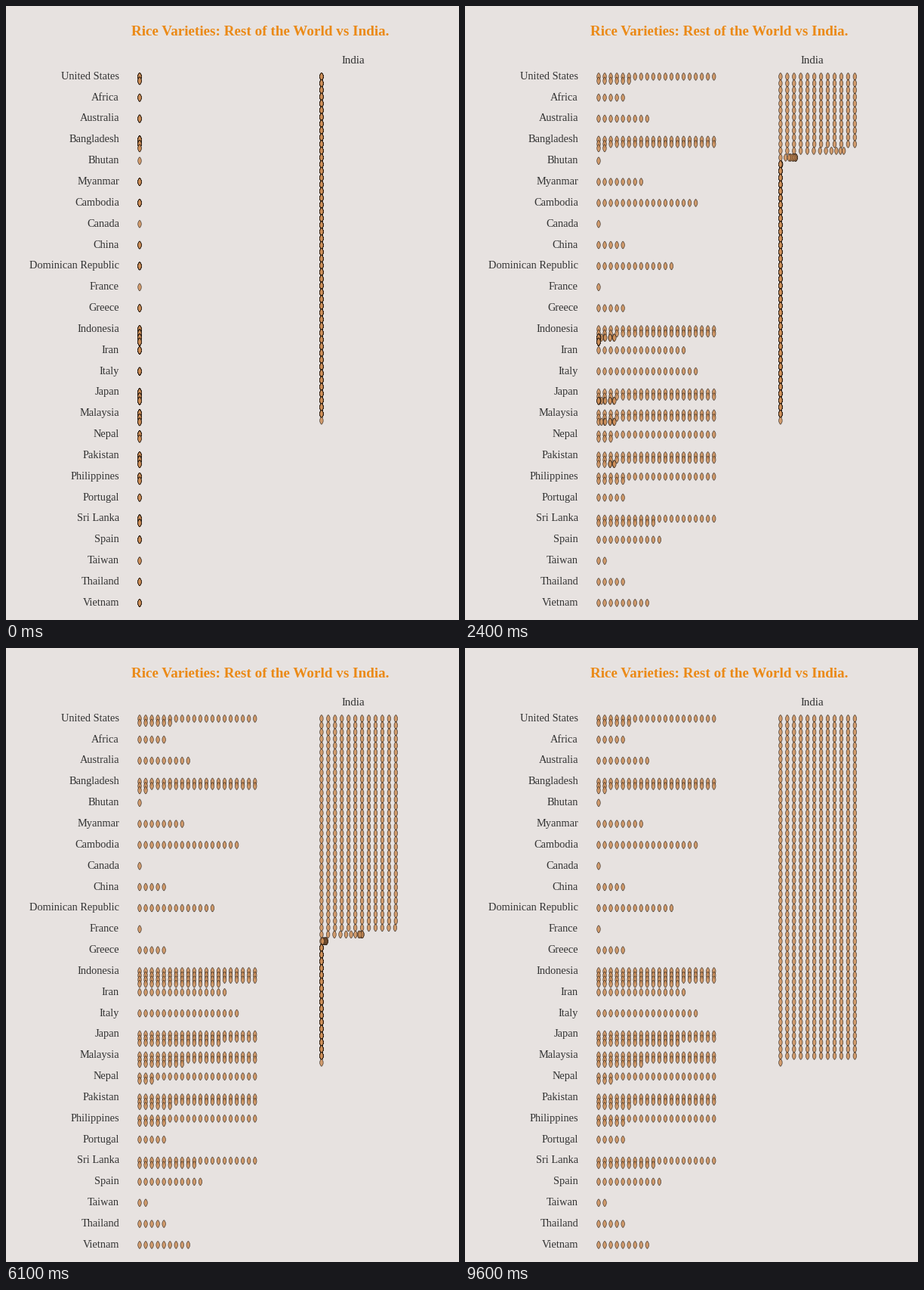
A matplotlib script that plays this animation: 600 by 812 pixels, repeating every 9800 ms.

```python
import numpy as np
import matplotlib.pyplot as plt
from matplotlib.animation import FuncAnimation
from matplotlib.collections import PathCollection
from matplotlib.path import Path
from matplotlib.transforms import IdentityTransform

W, H, DPI = 600, 812, 64
PX = 72 / DPI  # points per pixel
FRAMES, STEP = 98, 100

BACK, INK, TITLE = "#e7e2e0", "#333333", "#eb8a17"
FILL, EDGE = (0.81, 0.565, 0.35, 0.85), (0.08, 0.05, 0.03, 0.72)

COUNTS = {
    "United States": 26, "Africa": 5, "Australia": 9, "Bangladesh": 42,
    "Bhutan": 1, "Myanmar": 8, "Cambodia": 17, "Canada": 1, "China": 5,
    "Dominican Republic": 13, "France": 1, "Greece": 5, "Indonesia": 74,
    "Iran": 15, "Italy": 17, "Japan": 54, "Malaysia": 48, "Nepal": 23,
    "Pakistan": 46, "Philippines": 25, "Portugal": 5, "Sri Lanka": 30,
    "Spain": 11, "Taiwan": 2, "Thailand": 5, "Vietnam": 9,
}
INDIA = 613
TOP, PITCH = 93.4, 27.84
TRAVEL = 500  # ms each grain takes to slide into place
LEAD = 78     # ms already elapsed at the first frame


def block(n, cols, x, y, dx, dy, delay):
    """Rows of: start x, distance to slide, y, start time."""
    i = np.arange(n)
    return np.column_stack([np.full(n, x), i % cols * dx,
                            y + i // cols * dy, i * delay])


def ease(u):
    u = np.clip(u, 0, 1)
    return np.where(u < 0.5, 4 * u**3, 1 - 4 * (1 - u)**3)


blocks = [block(n, 20, 177, TOP + k * PITCH, 8.04, PITCH / 5, 50)
          for k, n in enumerate(COUNTS.values())]
blocks.append(block(INDIA, 12, 417.9, TOP, 8.95, 8.92, 15))
x0, slide, y0, start = np.vstack(blocks).T

grain = Path([(0, -5), (3.1, -2.3), (3.1, 2.3), (0, 5),
              (-3.1, 2.3), (-3.1, -2.3), (0, -5)],
             [Path.MOVETO] + [Path.CURVE4] * 6)

fig = plt.figure(figsize=(W / DPI, H / DPI), dpi=DPI, facecolor=BACK)
ax = fig.add_axes([0, 0, 1, 1])
ax.set_xlim(0, W)
ax.set_ylim(H, 0)
ax.axis("off")


def label(x, y, text, size, ha, color=INK, weight="normal"):
    ax.text(x, y, text, fontsize=size * PX, ha=ha, va="baseline", color=color,
            weight=weight, family="Liberation Serif")


label(337, 39, "Rice Varieties: Rest of the World vs India.", 19.1, "center",
      TITLE, "bold")
label(460, 76.5, "India", 15, "center")
for k, name in enumerate(COUNTS):
    label(150, 96.8 + k * PITCH, name, 14.4, "right")

# One path per grain keeps sub-pixel positions.
grains = PathCollection([grain] * len(x0), offsets=np.column_stack([x0, y0]),
                        offset_transform=ax.transData, facecolors=[FILL],
                        edgecolors=[EDGE], linewidths=[0.7 * PX])
grains.set_transform(IdentityTransform())
grains.set_snap(False)
ax.add_collection(grains, autolim=False)


def draw(frame):
    now = frame * STEP + LEAD
    x = x0 + slide * ease((now - start) / TRAVEL)
    grains.set_offsets(np.column_stack([x, y0]))
    return [grains]


anim = FuncAnimation(fig, draw, frames=FRAMES, interval=STEP, repeat=True,
                     repeat_delay=0)
plt.show()
```
